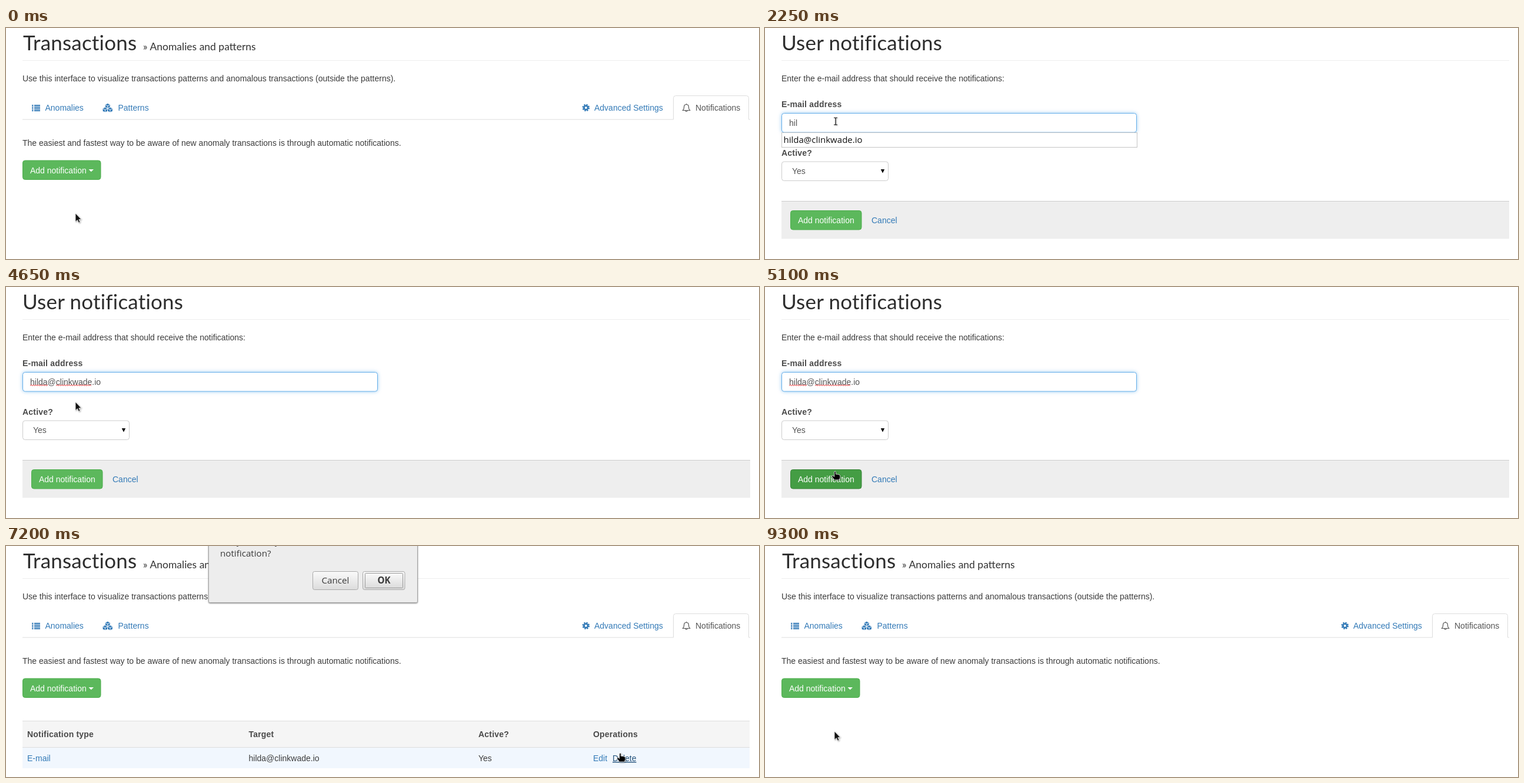
An HTML page that plays this animation: 1280 by 394 pixels, repeating every 9450 ms.

```html
<!DOCTYPE html>
<html lang="en">
<head>
<meta charset="utf-8">
<title>Notifications</title>
<style>
html, body { margin: 0; width: 100%; height: 100%; overflow: hidden; background: #fff; }
svg { display: block; width: 1280px; height: 394px; font: 14px "Liberation Sans", Arial, sans-serif; }
text { fill: #3c3c3c; white-space: pre; }
.title { font: 35px Lato, sans-serif; letter-spacing: .2px; fill: #2d2d2d; }
.sub { font: 17.5px Lato, sans-serif; fill: #333; }
.bold { font-weight: 700; letter-spacing: .2px; fill: #4a4a4a; }
.link { fill: #337ab7; }
.field { fill: #555; }
.white { fill: #fff; }
.ui { font: 15px "Open Sans", sans-serif; fill: #111; }
.dlg { font: 15.2px "Open Sans", sans-serif; fill: #3a3a3a; }
.mid { text-anchor: middle; }
.green { fill: #5cb85c; stroke: #4cae4c; }
.green.hot { fill: #449d44; stroke: #398439; }
.box { fill: #fff; stroke: #ccc; }
.box.focus { stroke: #66afe9; filter: drop-shadow(0 0 3px rgba(102,175,233,.65)); }
.hot-link { fill: #23527c; text-decoration: underline; }
#menu { filter: drop-shadow(0 3px 4px rgba(0,0,0,.15)); }
#dialog > rect:first-child { filter: drop-shadow(0 1px 1px rgba(0,0,0,.45)); }
#cursor { filter: drop-shadow(1px 1px 1px rgba(0,0,0,.35)); }
</style>
</head>
<body>
<svg viewBox="0 0 1280 394">
  <defs>
    <linearGradient id="shine" x2="0" y2="1">
      <stop offset="0" stop-color="#fafafa"/><stop offset="1" stop-color="#dcdcdc"/>
    </linearGradient>
    <g id="cube" stroke="#fff" stroke-width=".9" fill="#337ab7">
      <path d="M0-4.6L4.4-2.4V2.4L0 4.6L-4.4 2.4V-2.4Z"/>
      <path d="M-4-2L0-.1L4-2M0 0V4.4" fill="none"/>
    </g>
  </defs>
  <path d="M28 55.5H1265" stroke="#eee"/>

  <g id="list">
    <text class="title" x="29" y="38">Transactions</text>
    <text class="sub" x="233" y="38">» Anomalies and patterns</text>
    <text x="28" y="91">Use this interface to visualize transactions patterns and anomalous transactions (outside the patterns).</text>
    <path d="M28 156H1134.5V119.5a4 4 0 0 1 4-4H1258.500a4 4 0 0 1 4 4V156H1265" fill="none" stroke="#ddd"/>
    <path d="M44 132H46.500M44 135H46.500M44 138H46.500M44 141H46.500M48 132H58M48 135H58M48 138H58M48 141H58" stroke="#337ab7" stroke-width="2"/>
    <text class="link" x="66.500" y="141">Anomalies</text>
    <use href="#cube" x="172.800" y="133"/>
    <use href="#cube" x="168.500" y="139.500"/>
    <use href="#cube" x="177" y="139.500"/>
    <text class="link" x="190.500" y="141">Patterns</text>
    <g fill="none" stroke="#337ab7" stroke-width="2.600">
      <circle cx="985.800" cy="136" r="5" stroke-dasharray="2.200 1.727"/>
      <circle cx="985.800" cy="136" r="3.300"/>
    </g>
    <text class="link" x="1000" y="141">Advanced Settings</text>
    <g transform="translate(1156.500 136)" fill="none" stroke="#555" stroke-width="1.200">
      <path d="M-6 4.500C-4 2.500-3.800 0-3.800-2C-3.800-4.500-2-5.500 0-5.500S3.800-4.500 3.800-2C3.800 0 4 2.500 6 4.500ZM0-5.500V-7M-1.500 5A1.500 1.500 0 0 0 1.500 5"/>
    </g>
    <text class="field" x="1172" y="141">Notifications</text>
    <text x="28" y="201">The easiest and fastest way to be aware of new anomaly transactions is through automatic notifications.</text>
    <rect id="opener" class="green" x="28.500" y="226" width="132.500" height="32.500" rx="4"/>
    <text class="white" x="41" y="247.500">Add notification</text>
    <path d="M140.500 241H149L144.750 245.200Z" fill="#fff"/>

    <g id="menu">
      <rect x="28.500" y="261.500" width="159" height="37" rx="4" fill="#fff" stroke="#ccc"/>
      <rect id="item" x="29" y="267" width="158" height="26" fill="#f5f5f5"/>
      <text x="48" y="285">E-mail</text>
    </g>

    <g id="table">
      <rect x="28" y="299" width="1236" height="44" fill="#f5f5f5"/>
      <rect x="28" y="344" width="1236" height="35" fill="#f1f7fe"/>
      <path d="M28 298.500H1264M28 343.500H1264" stroke="#ddd"/>
      <g class="bold">
        <text class="bold" x="36" y="326">Notification type</text>
        <text class="bold" x="412.500" y="326">Target</text>
        <text class="bold" x="803" y="326">Active?</text>
        <text class="bold" x="998" y="326">Operations</text>
      </g>
      <text class="link" x="36" y="367">E-mail</text>
      <text id="mail" x="412.500" y="367"></text>
      <text x="803" y="367">Yes</text>
      <text class="link" x="998" y="367">Edit</text>
      <text id="del" x="1031" y="367">Delete</text>
    </g>

    <g id="dialog">
      <rect x="344.500" y="-30" width="355" height="126.500" rx="2" fill="#ededed" stroke="#a2a2a2"/>
      <text class="dlg" x="364" y="-3">Are you sure you want to delete this</text>
      <text class="dlg" x="364" y="18">notification?</text>
      <g fill="url(#shine)" stroke="#a9a9a9">
        <rect x="521.500" y="43.500" width="77" height="31" rx="3"/>
        <rect x="606.500" y="43.500" width="71.500" height="31" rx="3"/>
        <rect x="610.500" y="46.500" width="64" height="25" rx="1" stroke="#999"/>
      </g>
      <text class="dlg mid" x="560" y="64">Cancel</text>
      <text class="dlg mid" x="642.500" y="64" style="font-weight:700">OK</text>
    </g>
  </g>

  <g id="form">
    <text class="title" x="28" y="38">User notifications</text>
    <text x="28" y="91">Enter the e-mail address that should receive the notifications:</text>
    <text class="bold" x="28" y="135">E-mail address</text>
    <rect id="input" class="box" x="28.500" y="145.500" width="603" height="32.500" rx="4"/>
    <text id="typed" class="field" x="41" y="166.500"></text>
    <path id="wave" fill="none" stroke="#e33" stroke-width="1"/>
    <text class="bold" x="28" y="217.500">Active?</text>
    <rect class="box" x="28.500" y="228" width="181" height="32.500" rx="4"/>
    <text class="field" x="46" y="249">Yes</text>
    <path d="M196.800 241H203.200L200 247.500Z" fill="#000"/>
    <g id="hint">
      <rect x="28.500" y="178.500" width="604" height="25" fill="#fff" stroke="#c4c4c4"/>
      <text id="guess" class="ui" x="31.500" y="196"></text>
    </g>
    <rect x="28" y="296" width="1237" height="63.500" fill="#eee"/>
    <path d="M28 295.500H1265" stroke="#ccc"/>
    <rect id="submit" class="green" x="43.500" y="311.500" width="120.500" height="32.500" rx="4"/>
    <text class="white" x="56" y="333">Add notification</text>
    <text class="link" x="181" y="333">Cancel</text>
  </g>

  <g id="cursor">
    <path id="arrow" d="M0 0V14.500L3.400 11.500L5.600 16.300L8 15.200L5.900 10.600H10Z" fill="#111" stroke="#fff" stroke-width=".8"/>
    <path id="hand" d="M-.2-1Q1.200-2.600 2.400-1V3.200Q9.500 3.400 9.800 6V9.500L8.300 13H-.5L-4.500 7Q-4.200 4.800-2.200 6L-.2 7.500Z" fill="#000" stroke="#fff" stroke-width=".8"/>
    <path id="beam" d="M-1 -6H1Q2-6 2-5Q2-6 3-6H5M2-5V5M-1 6H1Q2 6 2 5Q2 6 3 6H5" fill="none" stroke="#111" stroke-width="1.200"/>
  </g>
</svg>
<script>
const LOOP = 9450, STEP = 150;
const MAIL = "hilda@clinkwade.io";
const HOME = [118, 316], DEL = [1043, 355];
const el = id => document.getElementById(id);
const show = (id, on) => el(id).setAttribute("visibility", on ? "inherit" : "hidden");
const within = (k, a, b) => k >= a && k < b;
const ease = u => u * u * (3 - 2 * u);
const glide = (a, b, u) => a.map((v, i) => v + (b[i] - v) * ease(Math.min(1, Math.max(0, u))));

// Vertical cursor stops along x = 118: [first step, y, shape]
const stops = [
  [0, 316, "arrow"], [1, 290, "arrow"], [2, 248, "hand"], [4, 264, "arrow"], [5, 277, "hand"],
  [7, 277, "arrow"], [9, 250, "arrow"], [10, 210, "arrow"], [11, 168, "beam"], [12, 159, "beam"],
  [31, 196, "arrow"], [32, 244, "arrow"], [33, 290, "arrow"], [34, 316, "hand"]
];

function pointer(k) {
  if (k < 37) {
    const [, y, shape] = stops.filter(s => s[0] <= k).pop();
    return [118, y, shape];
  }
  const p = k < 49 ? glide(HOME, DEL, (k - 36) / 7) : glide(DEL, HOME, (k - 55) / 7);
  return [...p, within(k, 43, 49) ? "hand" : "arrow"];
}

function zigzag(x, end) {
  let d = `M${x} 168.500`;
  for (let i = 1; x + i * 2 <= end; i++) d += `L${x + i * 2} ${i % 2 ? 166.8 : 168.5}`;
  return d;
}

function draw(ms) {
  const k = Math.floor((ms % LOOP) / STEP);
  const form = within(k, 7, 35);
  show("form", form);
  show("list", !form);
  show("menu", !form && within(k, 3, 7));
  show("item", !form && within(k, 5, 7));
  show("table", within(k, 35, 49));
  show("dialog", k === 48);
  el("opener").classList.toggle("hot", within(k, 2, 7));
  el("submit").classList.toggle("hot", k === 34);
  el("del").setAttribute("class", within(k, 43, 49) ? "hot-link" : "link");

  const n = Math.min(MAIL.length, Math.max(0, k - 12));
  el("typed").textContent = MAIL.slice(0, n);
  el("wave").setAttribute("d", (n > 5 ? zigzag(41, 71) : "") + (n > 15 ? zigzag(85, 145) : ""));
  el("input").classList.toggle("focus", k >= 12);
  show("hint", form && n > 0 && n < MAIL.length);

  const [x, y, shape] = pointer(k);
  el("cursor").setAttribute("transform", `translate(${Math.round(x)} ${Math.round(y)})`);
  for (const s of ["arrow", "hand", "beam"]) show(s, s === shape);
}

el("mail").textContent = el("guess").textContent = MAIL;
const start = performance.now();
function tick() {
  draw(performance.now() - start);
  requestAnimationFrame(tick);
}
tick();
</script>
</body>
</html>
```
